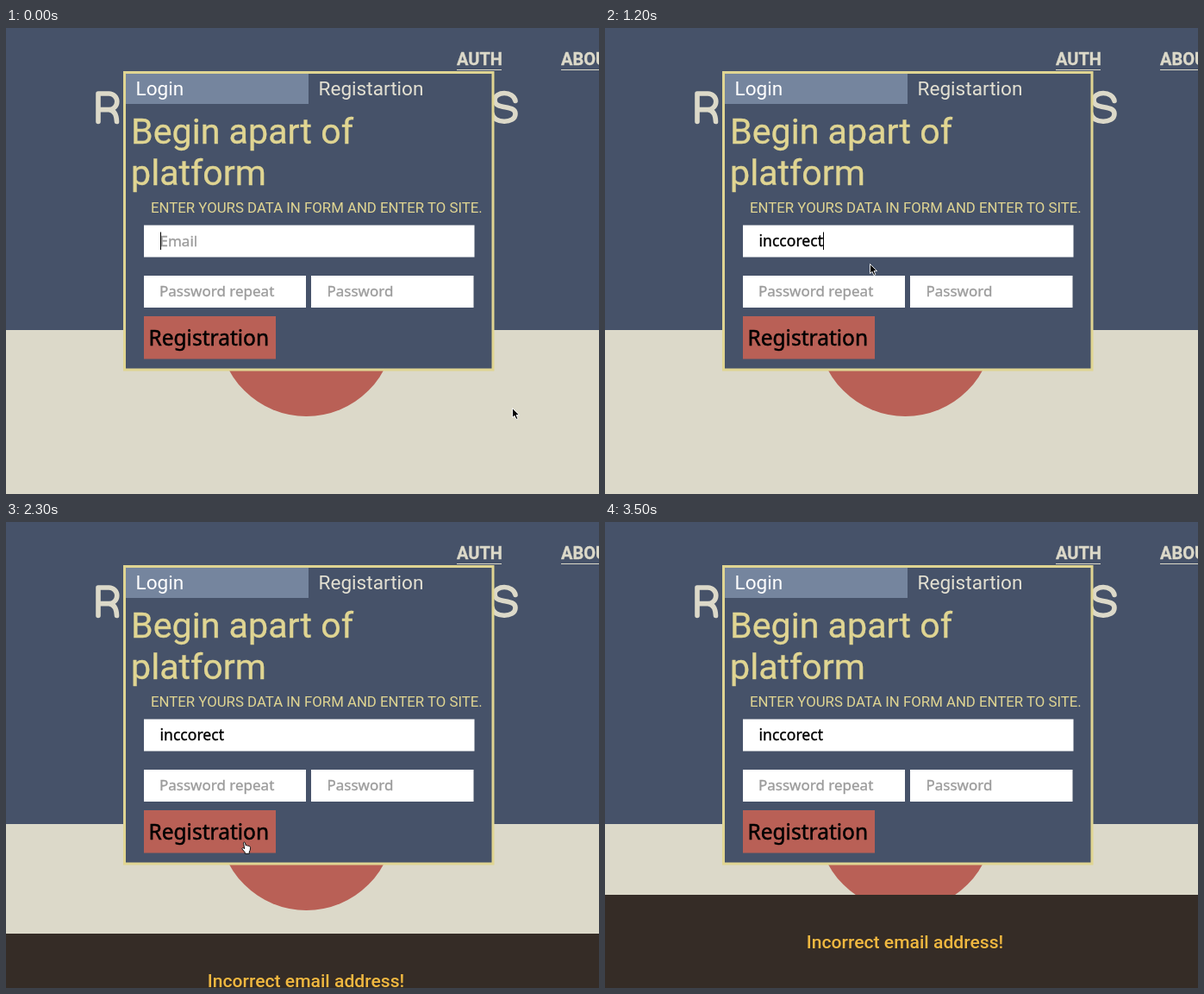
Animation, 688 px wide and 540 px high, one loop 3600 ms. Source, as an HTML page:

```html
<!DOCTYPE html>
<html lang="en">
<head>
<meta charset="utf-8">
<title>Registration form</title>
<style>
  html, body { margin: 0; width: 100%; height: 100%; overflow: hidden; background: #dcd9c9; }
  svg { display: block; width: 688px; height: 540px; }
  text { font-family: Roboto, Arial, sans-serif; white-space: pre; stroke-width: .35; }
  .nav { font-size: 20px; font-weight: 700; fill: #dcd9c9; stroke: #dcd9c9; }
  .tab { font-size: 22.6px; }
  .head { font-size: 41.2px; fill: #e0d592; stroke: #e0d592; }
  .hint { font-size: 16.8px; fill: #e0d592; }
  .field { font: 17px "Noto Sans", "Open Sans", sans-serif; fill: #9c9c9c; stroke: #9c9c9c; }
  .typed { font-size: 17.6px; fill: #000; stroke: #000; }
  .button { font: 24.5px "Noto Sans", "Open Sans", sans-serif; stroke: #000; stroke-width: .5; }
  .alert { font-size: 21.1px; font-weight: 500; fill: #f0b840; text-anchor: middle; }
  .logo { fill: none; stroke: #dcd9c9; stroke-width: 5.6; stroke-linecap: round; stroke-linejoin: round; }
</style>
</head>
<body>
<svg viewBox="0 0 688 540">
  <rect width="688" height="540" fill="#dcd9c9"/>
  <rect width="688" height="350" fill="#465269"/>
  <circle cx="348.5" cy="348" r="102" fill="#b96056"/>

  <text class="nav" x="523" y="43">AUTH</text>
  <text class="nav" x="644" y="43">ABOUT</text>
  <path d="M523 48.5H575M644 48.5H688" stroke="#dcd9c9"/>
  <path class="logo" d="M107 108.500V76H119.500a9.300 9.300 0 0 1 0 18.600H107M119.500 94.600Q128 95.500 128.500 108.500"/>
  <path class="logo" d="M591 84.500C589 72.500 567 73 567 83.500C567 95.500 591 88 591 99.500C591 111.500 565 111 564 99"/>

  <rect x="137.500" y="51.500" width="427.500" height="344.500" fill="#465269" stroke="#e0d592" stroke-width="3"/>
  <rect x="139" y="53" width="212" height="35" fill="#75859e"/>
  <text class="tab" x="150.500" y="78" fill="#fff">Login</text>
  <text class="tab" x="362.500" y="78" fill="#e3e0d2">Registartion</text>
  <text class="head" x="145" y="133.500">Begin apart of</text>
  <text class="head" x="145" y="181.500">platform</text>
  <text class="hint" x="168" y="214">ENTER YOURS DATA IN FORM AND ENTER TO SITE.</text>

  <g fill="#fff">
    <rect x="160" y="228.500" width="383.500" height="37"/>
    <rect x="160" y="287" width="188" height="37"/>
    <rect x="354" y="287" width="188.500" height="37"/>
  </g>
  <text class="field" id="email" x="178.500" y="253">Email</text>
  <text class="field typed" id="typed" x="178.500" y="253"></text>
  <rect id="caret" y="236.500" width="1" height="20.500"/>
  <text class="field" x="178" y="311">Password repeat</text>
  <text class="field" x="372.500" y="311">Password</text>
  <rect x="160" y="334" width="153" height="49.500" fill="#b96056"/>
  <text class="button" x="165.500" y="367.500">Registration</text>

  <g id="notice">
    <rect y="432" width="688" height="110" fill="#352c26"/>
    <text class="alert" x="348" y="494">Incorrect email address!</text>
  </g>

  <g id="pointer" stroke-linejoin="round">
    <path id="arrow" d="M.5 .5V11.500L3 9.300L4.900 13.500L6.900 12.600L5 8.600H8.500Z" fill="#000" stroke="#fff" stroke-width=".9"/>
    <path id="beam" d="M-2.500-6Q0-6 0-4.500Q0-6 2.500-6M0-4.500V5M-2.500 6Q0 6 0 4.500Q0 6 2.500 6M-1 2H1" fill="none" stroke="#222"/>
    <path id="hand" d="M-2.500-5.200C-2.200-6.300-.8-6.200-.5-5L.3-2C1-2.700 2-2.500 2.300-1.600C3-2.200 3.900-1.900 4.100-1C4.900-1.300 5.600-.8 5.600 .2L5.200 3.500L4.300 5V7.300H-.8V5.800L-3.800 2.200C-4.700 1-3.300 .1-2.300 .9L-1.300 1.700Z" fill="#fff" stroke="#111"/>
  </g>
</svg>
<script>
  const LOOP = 3600, STEP = 100, WORD = "inccorect";
  const $ = id => document.getElementById(id);
  const show = (id, on) => $(id).setAttribute("visibility", on ? "inherit" : "hidden");
  const clamp = v => Math.min(1, Math.max(0, v));

  // time, x, y of the pointer
  const path = [
    [0, 587, 440], [100, 576, 428], [500, 393, 243], [600, 385, 237],
    [1000, 385, 237], [1200, 307, 273], [1700, 278, 377], [LOOP, 278, 377]
  ];

  function pointerAt(t) {
    const i = path.findIndex(p => p[0] > t);
    const a = path[i - 1], b = path[i], k = (t - a[0]) / (b[0] - a[0]);
    return [a[1] + (b[1] - a[1]) * k, a[2] + (b[2] - a[2]) * k];
  }

  const inside = (x, y, l, t, r, b) => x >= l && x <= r && y >= t && y <= b;

  function shapeAt(x, y) {
    if (inside(x, y, 160, 334, 313, 384)) return "hand";
    const overField = inside(x, y, 160, 229, 543, 265)
      || inside(x, y, 160, 287, 348, 324) || inside(x, y, 354, 287, 543, 324);
    return overField ? "beam" : "arrow";
  }

  // cubic-bezier(.25, .1, .25, 1)
  function ease(v) {
    const curve = (s, p, q) => 3 * s * (1 - s) ** 2 * p + 3 * s * s * (1 - s) * q + s ** 3;
    let lo = 0, hi = 1;
    for (let i = 0; i < 24; i++) {
      const mid = (lo + hi) / 2;
      if (curve(mid, .25, .25) < v) lo = mid; else hi = mid;
    }
    return curve(hi, .1, 1);
  }

  function draw(t) {
    const [x, y] = pointerAt(t), shape = shapeAt(x, y);
    $("pointer").setAttribute("transform", `translate(${x} ${y})`);
    for (const id of ["arrow", "beam", "hand"]) show(id, id === shape);
    show("pointer", t < 3200 && !(t >= 800 && t < 1100));

    const count = Math.floor(WORD.length * clamp((t - 700) / 400));
    $("typed").textContent = WORD.slice(0, count);
    show("email", !count);
    const width = count ? $("typed").getComputedTextLength() : 0;
    $("caret").setAttribute("x", Math.round(178.6 + width));
    show("caret", t < 500 || (t >= 800 && t < 2200));

    const drop = 108 * (1 - ease(clamp((t - 2165) / 400)));
    $("notice").setAttribute("transform", `translate(0 ${Math.round(drop)})`);
    show("notice", t >= 2200);
  }

  const start = performance.now();
  function tick() {
    const t = (performance.now() - start) % LOOP;
    draw(Math.floor(t / STEP) * STEP);
    requestAnimationFrame(tick);
  }
  tick();
</script>
</body>
</html>
```
